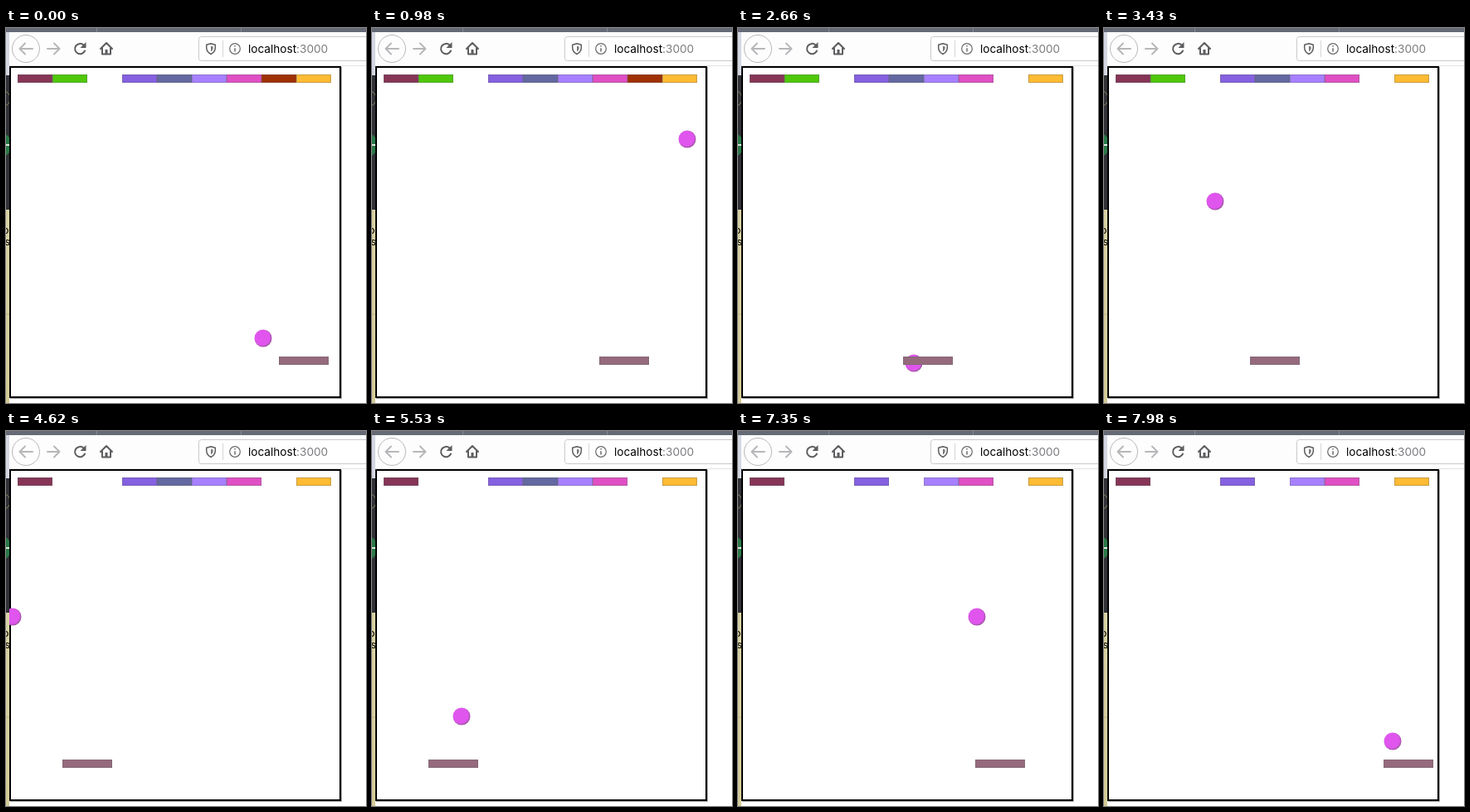
Animation, 434 px wide and 452 px high, one loop 8 s. Source, as an HTML page:

```html
<!DOCTYPE html>
<html lang="en">
<head>
<meta charset="utf-8">
<title>Brick breaker</title>
<style>
  html, body { margin: 0; width: 100%; height: 100%; overflow: hidden; background: #fff; }
  svg { display: block; width: 434px; height: 452px; }
  text { font-family: Inter, "Open Sans", sans-serif; }
  .icon { fill: none; stroke: #5d5d60; stroke-width: 2; stroke-linecap: round; stroke-linejoin: round; }
  .thin { stroke-width: 1.5; }
  .off { stroke: #b7b7ba; }
  .edge { fill: none; stroke: #606468; stroke-opacity: .35; }
</style>
</head>
<body>
<svg viewBox="0 0 434 452">
  <defs>
    <linearGradient id="sand" x2="0" y2="1">
      <stop stop-color="#d9d2a4"/><stop offset="1" stop-color="#d3cb98"/>
    </linearGradient>
    <radialGradient id="skin" cx=".46" cy=".46" r=".56">
      <stop offset=".76" stop-color="#e055ee"/><stop offset="1" stop-color="#8f5590"/>
    </radialGradient>
    <clipPath id="field"><rect x="4" y="46" width="400" height="400"/></clipPath>
  </defs>

  <!-- window behind -->
  <rect width="5" height="57" fill="#d5d8e2"/>
  <rect y="57" width="5" height="162" fill="#303237"/>
  <circle cx="-5" cy="85" r="10" fill="none" stroke="#8f7f62"/>
  <circle cx="-8" cy="141" r="15" fill="#2a7a48"/>
  <path d="M0 141h4" stroke="#dfe8df" stroke-width="2"/>
  <rect y="219" width="5" height="233" fill="url(#sand)"/>
  <path d="M0 345h4" stroke="#bdb688"/>
  <g font-size="12.5"><text x="-4" y="248">o</text><text x="-1.500" y="262">s</text></g>

  <!-- browser -->
  <rect x="4" width="430" height="452" fill="#fff"/>
  <rect x="4" y="5" width="430" height="41" fill="#fdfdfd"/>
  <rect width="434" height="5" fill="#656a76"/>
  <path d="M109.5 0v5M283.5 0v5" stroke="#858994"/>
  <path d="M4 45.5h430" stroke="#e2e2e4"/>
  <circle cx="24" cy="25" r="16.5" fill="#fdfdfd" stroke="#b9b9bc"/>
  <path class="icon off" d="M32 25H17M23 18.5L16.5 25L23 31.5"/>
  <path class="icon off" d="M50 25H64M58 18.5L64.5 25L58 31.5"/>
  <path class="icon" d="M95 27.500A6.200 6.200 0 1 1 93.500 20.500"/>
  <path d="M96.500 17v7h-7z" fill="#5d5d60"/>
  <path class="icon" d="M114 25L121 18L128 25M116 24.500V31.500H126V24.500"/>
  <rect x="119.500" y="26" width="3" height="6" fill="#5d5d60"/>
  <rect x="232.500" y="10.500" width="220" height="29" rx="3" fill="#fff" stroke="#c9c9cc"/>
  <path class="icon thin" d="M247 18.800L252.300 20.300V24Q252 29 247 31.500Q242 29 241.700 24V20.300Z"/>
  <path d="M247 21.800L249.600 22.600V24.500Q249.300 27.200 247 28.500Z" fill="#77777a"/>
  <path d="M261.500 15v20" stroke="#d5d5d8"/>
  <circle cx="276" cy="25" r="6.300" fill="none" stroke="#69696c" stroke-width="1.200"/>
  <path d="M276 24.200v4.300M276 21v1.600" stroke="#69696c" stroke-width="1.500"/>
  <text x="292" y="30" font-size="13.600">localhost<tspan fill="#7c7c80">:3000</tspan></text>

  <!-- game -->
  <path d="M404.500 47V446.500H5" fill="none" stroke="#000" stroke-opacity=".35"/>
  <rect x="5" y="47" width="398" height="398" fill="#fff" stroke="#000" stroke-width="2"/>
  <g clip-path="url(#field)">
    <circle id="ball" r="10.500" fill="url(#skin)"/>
    <g id="paddle">
      <rect y="396" width="60" height="10" fill="#956a7c"/>
      <rect class="edge" x=".5" y="396.500" width="59" height="9"/>
    </g>
    <g id="bricks"></g>
  </g>
</svg>
<script>
  const LOOP = 8000, STEP = 70;
  const SPEED_X = 2, SPEED_Y = 5;
  const TOP = 59, LEFT = 14, BRICK = 42;

  // Where the ball starts, turns and ends on each axis.
  const turnsX = [310, 393, 8, 348];
  const turnsY = [374, TOP, 404, TOP, 409, TOP, 374];

  // Pace of the game: ms, ball ticks, paddle x.
  const pace = [
    [0, 0, 329], [1960, 96, 219], [3430, 171, 176], [4620, 234, 68],
    [5530, 284, 68], [6650, 341, 229], [7980, 404, 337]
  ];

  const colors = ['#863557', '#4fc80c', null, '#8560e0', '#6468a0',
    '#a680ff', '#e04fc4', '#a03004', '#ffbb33'];

  const byId = id => document.getElementById(id);
  const ball = byId('ball'), paddle = byId('paddle');

  // Position after travelling a distance back and forth between turns.
  function zigzag(turns, distance) {
    for (let i = 1; i < turns.length; i++) {
      const run = turns[i] - turns[i - 1];
      if (distance <= Math.abs(run)) return turns[i - 1] + Math.sign(run) * distance;
      distance -= Math.abs(run);
    }
    return turns[turns.length - 1];
  }

  // Each turn at the top breaks the brick above the ball.
  const brokenAt = {};
  let travelled = 0;
  turnsY.forEach((y, i) => {
    if (i) travelled += Math.abs(y - turnsY[i - 1]);
    if (y !== TOP) return;
    const ticks = travelled / SPEED_Y;
    const x = zigzag(turnsX, ticks * SPEED_X);
    brokenAt[Math.ceil((x - LEFT) / BRICK) - 1] = ticks;
  });

  byId('bricks').innerHTML = colors.map((color, column) =>
    `<g transform="translate(${LEFT + BRICK * column} 56)">${color ? `
      <rect width="${BRICK}" height="10" fill="${color}"/>
      <rect class="edge" x=".5" y=".5" width="${BRICK - 1}" height="9"/>` : ''}</g>`).join('');
  const bricks = [...byId('bricks').children];

  function paceAt(time) {
    const next = pace.findIndex(key => key[0] >= time && key[0] > 0);
    const a = pace[next - 1], b = pace[next];
    const part = (time - a[0]) / (b[0] - a[0]);
    return [1, 2].map(i => Math.round(a[i] + (b[i] - a[i]) * part));
  }

  function draw(now) {
    const time = Math.floor(now % LOOP / STEP) * STEP;
    const [ticks, paddleX] = paceAt(time);
    ball.setAttribute('cx', zigzag(turnsX, ticks * SPEED_X));
    ball.setAttribute('cy', zigzag(turnsY, ticks * SPEED_Y));
    paddle.setAttribute('transform', `translate(${paddleX} 0)`);
    bricks.forEach((brick, column) => {
      brick.style.display = ticks >= brokenAt[column] ? 'none' : '';
    });
  }

  const start = performance.now();
  function tick() {
    draw(performance.now() - start);
    requestAnimationFrame(tick);
  }
  tick();
</script>
</body>
</html>
```
